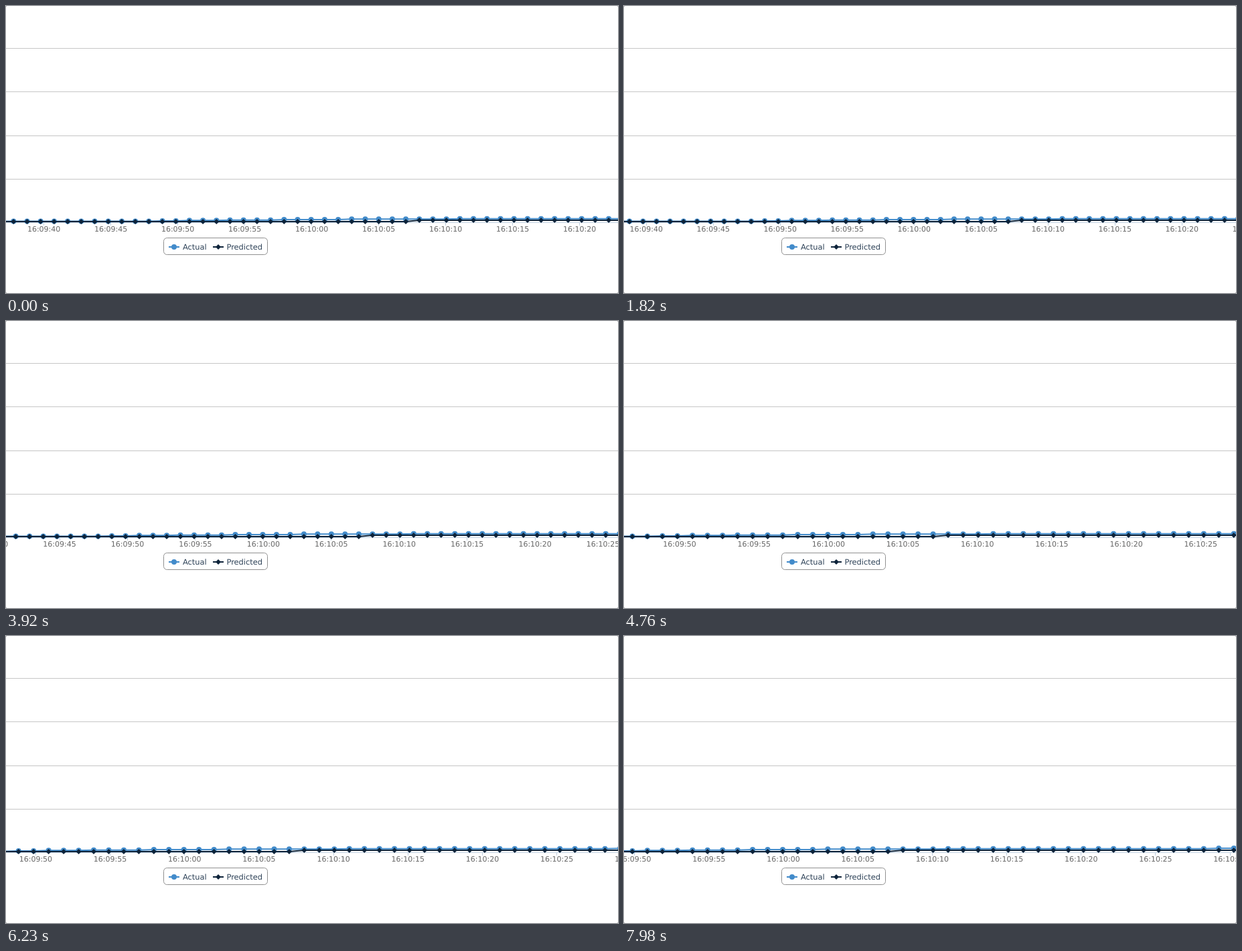
Write an HTML page that moves like this. It is 914x430 px and loops after 8 s.

```html
<!DOCTYPE html>
<html lang="en">
<head>
<meta charset="utf-8">
<title>Actual and predicted</title>
<style>
  html, body { margin: 0; width: 100%; height: 100%; overflow: hidden; background: #fff; }
  svg { display: block; font-family: "DejaVu Sans", sans-serif; text-rendering: geometricPrecision; }
  .actual { stroke: #428bca; stroke-width: 2; fill: none; }
  .predicted { stroke: #0d233a; stroke-width: 2; fill: none; }
  .actual.dots { fill: #428bca; stroke: none; }
  .predicted.dots { fill: #0d233a; stroke: none; }
  #labels { font-size: 11px; fill: #666; text-anchor: middle; }
  #legend { font-size: 11.4px; fill: #2c4056; }
</style>
</head>
<body>
<svg width="914" height="430" viewBox="0 0 914 430">
  <path d="M0 63.5H914M0 128.5H914M0 194.5H914M0 259.5H914" stroke="#c6c6c6"/>
  <path d="M0 0h1v1h-1zM913 0h1v1h-1zM0 429h1v1h-1zM913 429h1v1h-1z" fill="#bbb"/>
  <path d="M0 324.5H914" stroke="#c0d0e0"/>
  <path id="ticks" stroke="#c0d0e0"/>
  <path id="actualLine" class="actual"/>
  <path id="actualDots" class="actual dots"/>
  <path id="predictedLine" class="predicted"/>
  <path id="predictedDots" class="predicted dots"/>
  <g id="labels"></g>
  <g id="legend">
    <rect x="235.5" y="347.5" width="155" height="25" rx="5" fill="none" stroke="#909090"/>
    <path class="actual" d="M243 361h16"/>
    <circle class="actual dots" cx="251" cy="361" r="4"/>
    <text x="264" y="365">Actual</text>
    <path class="predicted" d="M309 361h16"/>
    <path class="predicted dots" d="M317 357l4 4-4 4-4-4z"/>
    <text x="329.5" y="365">Predicted</text>
  </g>
</svg>
<script>
const LOOP = 8000, FRAME = 70;
const FIRST_MOVE = 640, PERIOD = 1056, MOVE = 480;   // ms
const STEP = 1.01;                // seconds between samples
const JUMP = 7.025;               // last sample before the prediction rises
const RIGHT = 1005.8;             // right end of the axis, beyond the stage
const FIRST = -32, LAST = 26;     // samples drawn, counted from JUMP

const $ = id => document.getElementById(id);
const swing = p => 0.5 - Math.cos(Math.PI * Math.min(1, Math.max(0, p))) / 2;
const circle = (x, y) => `M${x - 4} ${y}a4 4 0 1 0 8 0a4 4 0 1 0 -8 0z`;
const diamond = (x, y) => `M${x} ${y - 4}l4 4-4 4-4-4z`;

// The actual value climbs towards its limit in small whole units
const actualY = n =>
  322.6 - 0.65 * Math.round(6.9 * (1 - Math.exp(-Math.max(0, n + 20) / 14.5)));
const predictedY = n => n > 0 ? 321 : 323;

// Place of a second after 16:10:00 once the axis has moved a number of steps
function restX(sec, steps) {
  const scale = steps < 4 ? 20 : 22.235;
  return RIGHT - scale * (27.46 + STEP * steps - sec);
}

// Labels every five seconds
const labels = [];
for (let sec = -25; sec <= 35; sec += 5) {
  const node = document.createElementNS("http://www.w3.org/2000/svg", "text");
  node.setAttribute("y", 338);
  node.textContent = new Date((58200 + sec) * 1000).toISOString().slice(11, 19);
  $("labels").append(node);
  labels.push({ sec, node });
}

function drawSeries(name, xOf, yOf, marker) {
  const points = [];
  for (let n = FIRST; n <= LAST; n++) points.push([xOf(JUMP + STEP * n), yOf(n)]);
  $(name + "Line").setAttribute("d", "M" + points.join("L"));
  $(name + "Dots").setAttribute("d", points.map(p => marker(...p)).join(""));
}

function draw(time) {
  const steps = Math.max(0, Math.floor((time - FIRST_MOVE) / PERIOD));
  const p = swing((time - FIRST_MOVE - steps * PERIOD) / MOVE);
  const xOf = sec => restX(sec, steps) * (1 - p) + restX(sec, steps + 1) * p;
  drawSeries("actual", xOf, actualY, circle);
  drawSeries("predicted", xOf, predictedY, diamond);
  for (const { sec, node } of labels) node.setAttribute("x", xOf(sec));
  $("ticks").setAttribute("d",
    labels.map(({ sec }) => `M${Math.floor(xOf(sec)) + 0.5} 324v5`).join(""));
}

const begin = performance.now();
function tick() {
  const time = (performance.now() - begin) % LOOP;
  draw(Math.floor(time / FRAME) * FRAME);
  requestAnimationFrame(tick);
}
tick();
</script>
</body>
</html>
```
